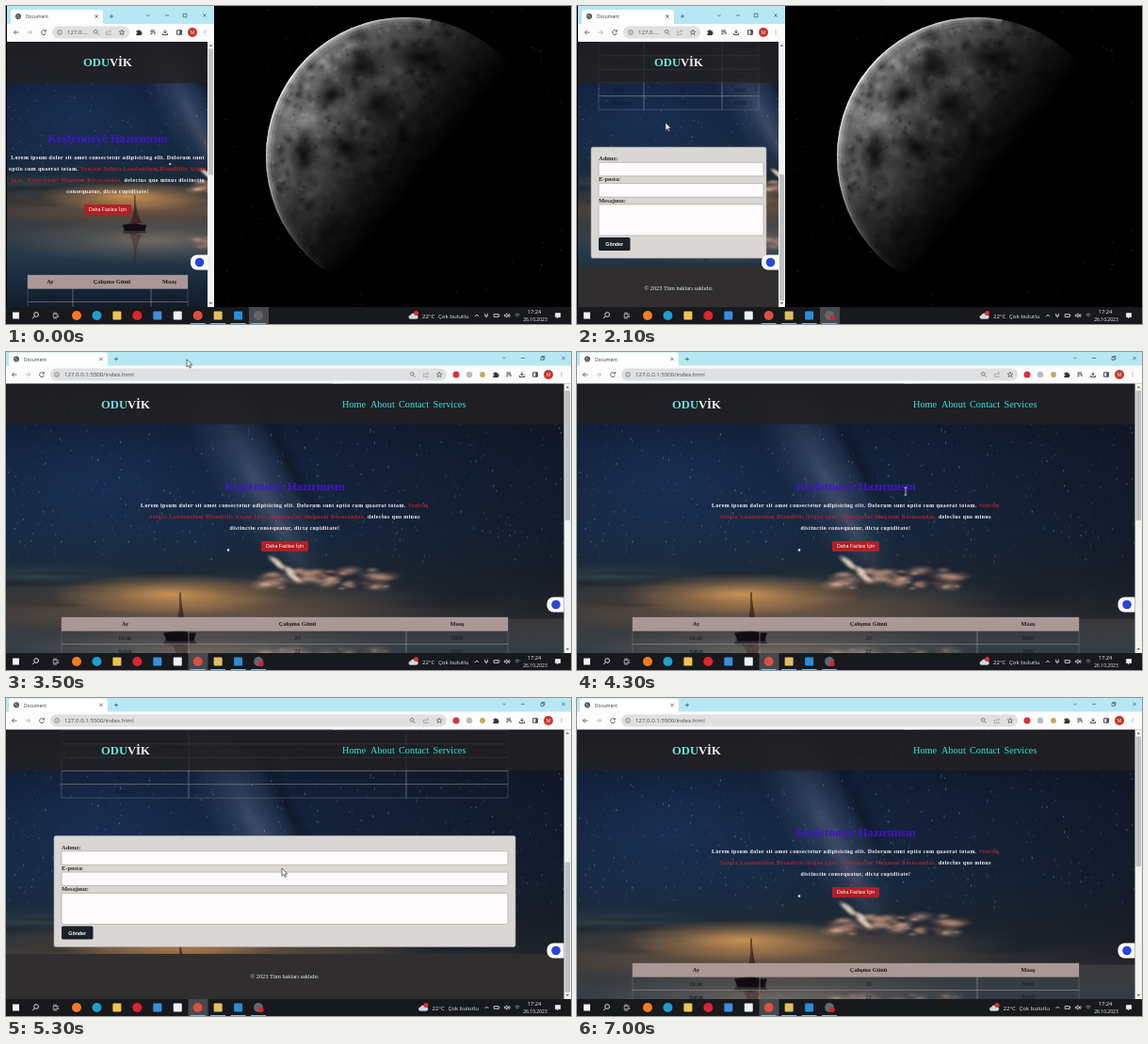
These frames come from a looping animation (600 px wide and 338 px high, 7.1 s). An HTML page with a canvas:

```html
<!DOCTYPE html>
<html lang="tr">
<head>
<meta charset="utf-8">
<title>Document</title>
<style>
html, body { margin: 0; width: 100%; height: 100%; overflow: hidden; background: #000; }
canvas { display: block; }
</style>
</head>
<body>
<canvas id="stage" width="600" height="338"></canvas>
<script>
const LOOP = 7100, STEP = 100, MAXIMIZE = 3400, TRAY_SHIFT = 4800, MAX_SCROLL = 276;
const SERIF = '"Liberation Serif", serif', SANS = '"Liberation Sans", sans-serif', UI = '"Open Sans", sans-serif';
const ctx = document.getElementById('stage').getContext('2d');

const SCROLL = [[0, 0], [800, 0], [1300, 88], [1900, 276], [2250, 276], [2750, 0],
  [4500, 0], [5150, 276], [5600, 276], [6200, 0]];
const POINTER = [[100, 268, 328], [700, 91, 119], [1300, 91, 119], [2100, 94, 124], [2450, 96, 118],
  [2900, 128, 81], [3300, 190, 6], [3450, 190, 6], [4200, 349, 148], [4500, 349, 148],
  [5300, 293, 181], [6200, 291, 185], [6900, 268, 329]];

const NARROW = {
  left: 1, right: 214, edge: 221, top: 38, bar: 28, tabY: 11, scale: .734, header: 44,
  tab: [5, 103], cx: 108, brandX: 82, titleY: 145, paraY: 163, buttonY: 216.5, tableY: 286,
  formY: 426, form: [15, 201], cols: [23, 71, 154, 193], field: [23, 198], footerY: 552,
  nav: [11, 25, 40], pill: [49, 131], url: '127.0....', urlX: 65, urlIcons: [96, 109, 123],
  tools: [141, 156, 169, 184, 198, 211], controls: [151, 171, 190, 211],
  lines: ['Lorem ipsum dolor sit amet consectetur adipisicing elit. Dolorum sunt',
    'optio cum quaerat totam. |Veniam Soluta Laudantium Blanditiis Atque',
    '|Ipsa, Aspernatur Magnam Recusandae,| delectus quo minus distinctio',
    'consequatur, dicta cupiditate!']
};
const WIDE = {
  left: 0, right: 592.5, edge: 600, top: 33.5, bar: 24, tabY: 7.5, scale: 1, header: 43.5,
  tab: [3, 108], cx: 296, brandX: 101, titleY: 147, paraY: 165, buttonY: 206.5, tableY: 282,
  formY: 422.5, form: [51, 541], cols: [59, 194, 425, 533], field: [59, 533], footerY: 548,
  nav: [9, 23, 38], pill: [47, 468], url: '127.0.0.1:5500/index.html', urlX: 62, urlIcons: [432, 446, 460],
  tools: [520, 534, 548, 562, 576, 590], controls: [529, 549, 570, 592],
  lines: ['Lorem ipsum dolor sit amet consectetur adipisicing elit. Dolorum sunt optio cum quaerat totam. |Veniam',
    '|Soluta Laudantium Blanditiis Atque Ipsa, Aspernatur Magnam Recusandae,| delectus quo minus',
    'distinctio consequatur, dicta cupiditate!']
};
const TABLE = ['Ay,Çalışma Günü,Maaş', 'Ocak,20,5000', 'Şubat,22,5500', 'Mart,20,5000',
  'Nisan,22,6000', 'Mayıs,22,6000', 'Haziran,22,6700'].map(row => row.split(','));

const ICON = {
  back: 'M2.5 0h-5M-.3-2.3L-2.6 0-.3 2.3',
  forward: 'M-2.5 0h5M.3-2.3L2.6 0 .3 2.3',
  reload: 'M2.2-1.2A2.5 2.5 0 1 0 2.5.6M2.4-2.8v1.8h-1.8',
  info: 'M2.4 0A2.4 2.4 0 1 1-2.4 0 2.4 2.4 0 1 1 2.4 0M0-.2v1.4M0-1.3v.5',
  search: 'M1-.7A1.8 1.8 0 1 1-2.6-.7 1.8 1.8 0 1 1 1-.7M.5.6L2.6 2.7',
  share: 'M-1-1h-1.5v3.5h4.5v-1.5M-.8.8C-.6-.8.5-1.4 2.4-1.4M1.2-2.7L2.6-1.4 1.2-.1',
  star: 'M0-2.8L.8-.9 2.8-.8 1.2.5 1.8 2.5 0 1.4-1.8 2.5-1.2.5-2.8-.8-.8-.9z',
  puzzle: 'M-2.5-1.5h1.5a1 1 0 1 1 2 0h1.5v1.5a1 1 0 1 1 0 2v1h-5v-1.5a1 1 0 1 0 0-2z',
  list: 'M-2.6-2h4.6M-2.6-.2h4.6M-2.6 1.6h2M2-.2v2.4',
  download: 'M0-2.6v3.4M-1.6-.8L0 .8 1.6-.8M-2.6 1v1.6h5.2v-1.6',
  panel: 'M-2.4-2.2h4.8v4.4h-4.8zM.9-2.2v4.4M1.6-2.2v4.4',
  dots: 'M0-2.2v.6M0-.3v.6M0 1.6v.6',
  close: 'M-1.7-1.7l3.4 3.4M1.7-1.7l-3.4 3.4',
  plus: 'M-2 0h4M0-2v4',
  minimize: 'M-2 0h4',
  maximize: 'M-1.8-1.8h3.6v3.6h-3.6z',
  restore: 'M-2-.9h2.9v2.9h-2.9zM-.9-1v-1h2.9v2.9h-1',
  down: 'M-1.6-.7L0 .8 1.6-.7',
  up: 'M-2 1L0-1 2 1',
  globe: 'M2.4 0A2.4 2.4 0 1 1-2.4 0 2.4 2.4 0 1 1 2.4 0M-2.2-.6L0 .4l-.6 1.8M.4-2.2L1 0l1.2.6',
  find: 'M3-1A2.4 2.4 0 1 1-1.8-1 2.4 2.4 0 1 1 3-1M-1.1.7L-3.4 3.2',
  tasks: 'M-2.8-1.6h4v3.4h-4zM2.6-2v1M2.6 0v2M-2.8-2.9h4M-2.8 3h4',
  plug: 'M-1.3-2.2v2.6h2.6v-2.6M0 .4v2',
  battery: 'M-2.8-1.4h5v2.8h-5zM2.9-.5v1',
  speaker: 'M-2.6-.8h1.2l1.5-1.4v4.4l-1.5-1.4h-1.2zM1.2-1q1 1 0 2M2.3-1.8q1.8 1.8 0 3.6',
  wifi: 'M-2.6-.8q2.6-2.4 5.2 0M-1.5.5q1.5-1.3 3 0M0 1.6v.4',
  note: 'M-2.6-2.4h5.2v4h-2l-1.2 1.3v-1.3h-2z',
  arrow: 'M0 0V8.2L1.9 6.4 3.2 9.3 4.5 8.7 3.2 5.9H5.8z',
  ibeam: 'M-1.4-4h2.8M0-4v8M-1.4 4h2.8',
  cloud: 'M-3.6 2.4a1.8 1.8 0 0 1 .3-3.6 2.8 2.8 0 0 1 5.2-.4 2 2 0 0 1 1 4z'
};
for (const name in ICON) ICON[name] = new Path2D(ICON[name]);

function random(seed) {
  return () => (seed = (seed * 16807) % 2147483647) / 2147483647;
}
function keyed(keys, t) {
  const next = keys.findIndex(k => k[0] > t);
  if (next < 0) return keys[keys.length - 1].slice(1);
  if (next === 0) return keys[0].slice(1);
  const a = keys[next - 1], b = keys[next], p = (t - a[0]) / (b[0] - a[0]);
  const e = p * p * (3 - 2 * p);
  return a.slice(1).map((v, i) => v + (b[i + 1] - v) * e);
}
function paint(w, h, draw) {
  const layer = Object.assign(document.createElement('canvas'), { width: w, height: h });
  draw(layer.getContext('2d'));
  return layer;
}
function glow(g, x, y, rx, ry, rgb, alpha, angle = 0) {
  const fade = g.createRadialGradient(0, 0, 0, 0, 0, 1);
  fade.addColorStop(0, `rgba(${rgb},${alpha})`);
  fade.addColorStop(.5, `rgba(${rgb},${alpha * .4})`);
  fade.addColorStop(1, `rgba(${rgb},0)`);
  g.save();
  g.translate(x, y);
  g.rotate(angle);
  g.scale(rx, ry);
  g.fillStyle = fade;
  g.fillRect(-1, -1, 2, 2);
  g.restore();
}
function gradient(g, line, stops) {
  const fill = g.createLinearGradient(...line);
  stops.forEach(([at, color]) => fill.addColorStop(at, color));
  return fill;
}
function rect(x, y, w, h, color, radius = 0, border) {
  ctx.beginPath();
  ctx.roundRect(x, y, w, h, radius);
  ctx.fillStyle = color;
  ctx.fill();
  if (border) { ctx.strokeStyle = border; ctx.lineWidth = .6; ctx.stroke(); }
}
function disc(x, y, r, color, g = ctx) {
  g.beginPath();
  g.arc(x, y, r, 0, 7);
  g.fillStyle = color;
  g.fill();
}
function icon(name, x, y, color = '#444', width = .8, fill) {
  ctx.save();
  ctx.translate(x, y);
  ctx.lineWidth = width;
  ctx.strokeStyle = color;
  if (fill) { ctx.fillStyle = fill; ctx.fill(ICON[name]); }
  ctx.stroke(ICON[name]);
  ctx.restore();
}
function text(str, x, y, font, color, align = 'left') {
  ctx.font = font;
  ctx.fillStyle = color;
  ctx.textAlign = align;
  ctx.fillText(str, x, y);
}

const wallpaper = paint(600, 338, g => {
  const rnd = random(77);
  g.fillStyle = '#000';
  g.fillRect(0, 0, 600, 338);
  g.save();
  g.beginPath();
  g.arc(424, 160, 148, 0, 7);
  g.clip();
  g.fillStyle = '#777';
  g.fillRect(270, 0, 310, 320);
  for (let i = 0; i < 1800; i++) {
    const r = .8 + rnd() ** 3 * 11;
    glow(g, 276 + rnd() * 230, 12 + rnd() * 280, r, r * (.6 + rnd() * .6),
      rnd() < .5 ? '15,15,15' : '200,200,200', .2 + rnd() * .35, rnd() * 3);
  }
  [[316, 158, 17, 32, 0], [378, 64, 34, 24, -.4], [345, 95, 26, 18, -.8], [440, 55, 40, 22, .2],
   [395, 105, 30, 24, .3], [360, 150, 24, 18, .6]]
    .forEach(([x, y, rx, ry, a]) => glow(g, x, y, rx, ry, '18,18,18', .95, a));
  glow(g, 318, 122, 26, 18, '225,225,225', .6, -.7);
  glow(g, 342, 195, 38, 28, '200,200,200', .5, .5);
  [[16, .12], [9, .25], [4, .45], [2, .8]].forEach(([width, alpha]) => {
    g.beginPath();
    g.arc(424, 160, 148, 2.2, 4.9);
    g.lineWidth = width;
    g.strokeStyle = `rgba(255,255,255,${alpha})`;
    g.stroke();
  });
  g.restore();
  disc(424, 160, 150, gradient(g, [309, 65, 446, 175], [[0, 'rgba(0,0,0,0)'], [.4, 'rgba(0,0,0,.42)'],
    [.72, 'rgba(0,0,0,.8)'], [1, '#000']]), g);
  for (let i = 0; i < 130; i++) {
    const x = 222 + rnd() * 378, y = rnd() * 320;
    if (Math.hypot(x - 424, y - 160) < 150) continue;
    g.fillStyle = `rgba(255,255,255,${.08 + rnd() * .3})`;
    g.fillRect(x, y, .9, .9);
  }
});

const lake = paint(593, 385, g => {
  const rnd = random(2023), horizon = 250;
  g.fillStyle = gradient(g, [0, 0, 0, 385], [[0, '#0c1628'], [.2, '#13223c'], [.42, '#172840'],
    [.52, '#1c2936'], [.59, '#29313a'], [.65, '#3b3a3b'], [.72, '#373e45'], [.8, '#26394a'],
    [.9, '#192b3d'], [1, '#121c2a']]);
  g.fillRect(0, 0, 593, 385);
  glow(g, 100, 110, 190, 120, '32,66,120', .35);
  glow(g, 262, 95, 140, 45, '95,115,150', .45, 1.05);
  glow(g, 290, 150, 80, 16, '130,115,130', .3, 1.05);
  glow(g, 300, 85, 90, 13, '8,14,26', .6, 1.1);
  g.fillStyle = gradient(g, [300, 0, 593, 0], [[0, 'rgba(16,18,26,0)'], [1, 'rgba(16,18,26,.55)']]);
  g.fillRect(300, 0, 293, horizon);
  for (let i = 0; i < 1300; i++) {
    g.fillStyle = `rgba(205,220,255,${.06 + rnd() ** 3 * .75})`;
    const size = .6 + rnd() * .5;
    g.fillRect(rnd() * 593, rnd() * 190, size, size);
  }
  disc(236, 177, 1.3, '#eef3ff', g);
  glow(g, 30, 205, 130, 16, '75,100,100', .4);
  for (let i = 0; i < 30; i++)
    glow(g, rnd() * 593, 190 + rnd() * 50, 30 + rnd() * 60, 2 + rnd() * 6, '24,30,38', .5);
  glow(g, 200, 236, 270, 34, '185,130,80', .55);
  glow(g, 175, 224, 130, 22, '240,170,90', .75);
  glow(g, 210, 288, 210, 34, '175,150,125', .5);
  for (let i = 0; i < 70; i++) {
    const x = 272 + rnd() * 138, y = 198 + rnd() * 20, r = 2 + rnd() * 7;
    const rgb = rnd() < .35 ? '50,40,45' : '225,170,140';
    glow(g, x, y, r * 2, r * .7, rgb, .55);
    glow(g, x, 2 * horizon - y, r * 2, r * .8, rgb, .25);
  }
  for (let i = 0; i < 9; i++)
    glow(g, 283 + i * 3 + rnd() * 5, 187 + i * 2.6, 8, 4.5, '255,228,205', .75, .5);
  glow(g, 305, 2 * horizon - 210, 24, 12, '245,215,190', .6);
  for (const flip of [1, -1]) {
    g.save();
    g.translate(185, 271);
    g.scale(1, flip);
    g.globalAlpha = flip > 0 ? 1 : .5;
    g.fillStyle = '#4a2420';
    g.fill(new Path2D('M-1-32Q-3-14-8-8H-1zM1-42Q3-18 11-8H1z'));
    g.fillStyle = '#120d12';
    g.fill(new Path2D('M-.5-49h1v46h-1zM-18-6L-11-7 0-8 12-6 17-6 14 3H-14z'));
    g.restore();
  }
});

function drawChrome(m, wide) {
  const { tab, bar, tabY, edge, left, tools } = m;
  rect(left, 0, edge - left, m.top, '#b5e8f4');
  rect(tab[0], tabY - 7, tab[1] - tab[0], 20, '#fff', 3);
  rect(left, m.top - 19, edge - left, 19, '#fcfcfd');
  icon('globe', tab[0] + 8, tabY, '#444', 1.1);
  text('Document', tab[0] + 16, tabY + 2, '4.9px ' + UI, '#333');
  icon('close', tab[1] - 7, tabY, '#444', .7);
  icon('plus', tab[1] + 9, tabY, '#444', .7);
  ['down', 'minimize', wide ? 'restore' : 'maximize', 'close']
    .forEach((name, i) => icon(name, m.controls[i], tabY - 1, '#333', .6));
  ['back', 'forward', 'reload'].forEach((name, i) => icon(name, m.nav[i], bar, i === 1 ? '#aaa' : '#444'));
  rect(m.pill[0], bar - 6.5, m.pill[1] - m.pill[0], 13, '#dfe0e2', 6.5);
  icon('info', m.urlX - 8, bar, '#555', .6);
  text(m.url, m.urlX, bar + 2.2, '6.1px ' + UI, '#444');
  ['search', 'share', 'star'].forEach((name, i) => icon(name, m.urlIcons[i], bar, i === 1 ? '#999' : '#555', .7));
  if (wide) ['#d8323a', '#b9bcc0', '#c9a55c'].forEach((c, i) => disc(478 + 14 * i, bar, 3.5 - i * .3, c));
  icon('puzzle', tools[0], bar, '#333', .3, '#333');
  ['list', 'download', 'panel'].forEach((name, i) => icon(name, tools[i + 1], bar, '#333', .9));
  disc(tools[4], bar, 5, '#c5352b');
  text('M', tools[4], bar + 2, '5px ' + UI, '#fff', 'center');
  icon('dots', tools[5], bar, '#444', 1);
}

function drawParagraph(m) {
  ctx.font = 'bold 5.9px ' + SERIF;
  m.lines.forEach((line, i) => {
    const parts = line.split('|').map((str, k) => {
      const spacing = k % 2 ? '.53px' : '.43px';
      ctx.letterSpacing = spacing;
      return { str, spacing, width: ctx.measureText(str).width, color: k % 2 ? '#b8232b' : '#f4f4f4' };
    });
    let x = m.cx - parts.reduce((sum, p) => sum + p.width, 0) / 2;
    for (const p of parts) {
      ctx.letterSpacing = p.spacing;
      text(p.str, x, m.paraY + 12 * i, ctx.font, p.color);
      x += p.width;
    }
  });
  ctx.letterSpacing = '0px';
}

function drawTable(m) {
  const { cols, tableY } = m, rowH = 14.3, width = cols[3] - cols[0];
  rect(cols[0], tableY, width, rowH, '#ab9896');
  ctx.strokeStyle = 'rgba(165,160,160,.5)';
  ctx.lineWidth = .6;
  TABLE.forEach((row, i) => {
    const y = tableY + i * rowH;
    row.forEach((cell, c) => {
      ctx.strokeRect(cols[c], y, cols[c + 1] - cols[c], rowH);
      text(cell, (cols[c] + cols[c + 1]) / 2, y + 9.3, (i ? '' : 'bold ') + '6.4px ' + SERIF,
        i ? '#10161f' : '#1c1717', 'center');
    });
  });
}

function drawForm(m) {
  const y = m.formY, [x, end] = m.field, width = end - x;
  rect(m.form[0], y, m.form[1] - m.form[0], 118, '#d9d6d3', 2, '#aaa59f');
  [['Adınız:', 14, 14.5], ['E-posta:', 36.3, 14.5], ['Mesajınız:', 58.6, 33]].forEach(([label, dy, h]) => {
    text(label, x, y + dy, 'bold 6.45px ' + SERIF, '#2b2828');
    rect(x, y + dy + 2.3, width, h, '#fdfafc', 1.5, '#a39a98');
  });
  rect(x, y + 96, 33.5, 14, '#1a2028', 1.5);
  text('Gönder', x + 16.7, y + 105, 'bold 5.3px ' + SANS, '#fff', 'center');
}

function drawPage(m, wide, scroll) {
  const { left, right, top, cx } = m, width = right - left;
  ctx.save();
  ctx.beginPath();
  ctx.rect(left, top, width, 320 - top);
  ctx.clip();
  ctx.drawImage(lake, left, top, 593 * m.scale, 385 * m.scale);

  ctx.save();
  ctx.translate(0, -scroll);
  text('Keşfetmeye Hazırmısın', cx, m.titleY, 'bold 12.75px ' + SERIF, '#4216c6', 'center');
  drawParagraph(m);
  rect(cx - 25, m.buttonY - 5.5, 50, 11, '#b21f24', 1.5);
  text('Daha Fazlası İçin', cx, m.buttonY + 1.9, '5.2px ' + SANS, '#fff', 'center');
  drawTable(m);
  drawForm(m);
  rect(left, m.footerY, width, 50, '#312e2f');
  text('© 2023 Tüm hakları saklıdır.', cx, m.footerY + 26, '6.3px ' + SERIF, '#f2f2f2', 'center');
  ctx.restore();

  rect(left, top, width, m.header, 'rgba(36,33,33,.8)');
  text('ODU', m.brandX, top + 26, 'bold 12.6px ' + SERIF, '#6fe0dc');
  text('VİK', m.brandX + ctx.measureText('ODU').width, top + 26, ctx.font, '#f4f4f4');
  if (wide) [['Home', 357], ['About', 387], ['Contact', 417], ['Services', 453.5]]
    .forEach(([label, x]) => text(label, x, 59, '10.3px ' + SERIF, '#35e3e3'));
  const badgeY = wide ? 268.5 : 272.5;
  rect(right - 18, badgeY - 8, 24, 16, '#fff', 7);
  disc(right - 8.5, badgeY, 4.8, '#2b46d8');
  ctx.restore();

  rect(right, top, m.edge - right, 320 - top, '#f1f1f1');
  rect(right + 1, top + 7.5 + scroll / MAX_SCROLL * 133.5, m.edge - right - 2, wide ? 138 : 134, '#bfc0c2');
  const mid = (right + m.edge) / 2;
  ctx.fillStyle = '#666';
  ctx.fill(new Path2D(`M${mid - 1.8} ${top + 4.8}l1.8-2 1.8 2zM${mid - 1.8} 315l1.8 2 1.8-2z`));
}

function drawTaskbar(wide, t) {
  rect(0, 320, 600, 18, '#17191d');
  rect(wide ? 193.5 : 258, 320, 21, 18, '#47494d');
  rect(7, 325.5, 7, 7, '#f2f2f2');
  icon('find', 31.5, 329, '#eee', .9);
  icon('tasks', 53, 329, '#ddd', .7);
  ['#f57c24', '#1f9fcb', '#efc550', '#df2431', '#3a8fe0', '#eef0f2', '#dd4f40', '#e3bf5f', '#2a8ed5', '#66676c']
    .forEach((color, i) => {
      const x = 75 + 21.45 * i;
      if ([0, 1, 3, 6, 9].includes(i)) disc(x, 329, 5, color);
      else rect(x - 4.5, 324.5, 9, 9, color, 1);
      if (i > 5) rect(x - 8, 337, 16, 1, '#79b6e3');
    });
  if (t >= 100) disc(271, 331.5, 2.7, '#d9222c');

  const shifted = t >= TRAY_SHIFT, dx = shifted ? 10.5 : 0;
  icon('cloud', 433 + dx, 330, '#cfd8e2', .4, '#cfd8e2');
  disc(435.5 + dx, 326.5, 2.5, '#d8322f');
  text('22°C', 442 + dx, 331.5, '6.1px ' + UI, '#f0f0f0');
  text('Çok bulutlu', 459 + dx, 331.5, '6.1px ' + UI, '#f0f0f0');
  icon('up', 500 + dx, 329, '#eee');
  ['plug', 'battery', 'speaker', 'wifi'].forEach((name, i) => {
    if (i || !shifted) icon(name, 510 + 11 * i, 329, i === 3 ? '#999' : '#eee', .8);
  });
  text('17:24', 561, 326.8, '5.7px ' + UI, '#f4f4f4', 'center');
  text('26.10.2023', 562, 335, '5px ' + UI, '#f4f4f4', 'center');
  icon('note', 586, 329, '#eee', .7, '#eee');
}

function drawPointer(t, wide, scroll) {
  if (t < 100 || t >= 6900) return;
  const [x, y] = keyed(POINTER, t);
  if (wide && scroll < 20 && y > 136 && y < 160) icon('ibeam', x, y, '#ddd', .8);
  else icon('arrow', x, y, '#333', .7, '#fff');
}

function render(now) {
  const t = Math.floor(now % LOOP / STEP) * STEP;
  const wide = t >= MAXIMIZE, mode = wide ? WIDE : NARROW;
  const [scroll] = keyed(SCROLL, t);
  ctx.drawImage(wallpaper, 0, 0);
  drawChrome(mode, wide);
  drawPage(mode, wide, scroll);
  drawTaskbar(wide, t);
  drawPointer(t, wide, scroll);
}

const start = performance.now();
function tick() {
  render(performance.now() - start);
  requestAnimationFrame(tick);
}
tick();
</script>
</body>
</html>
```
